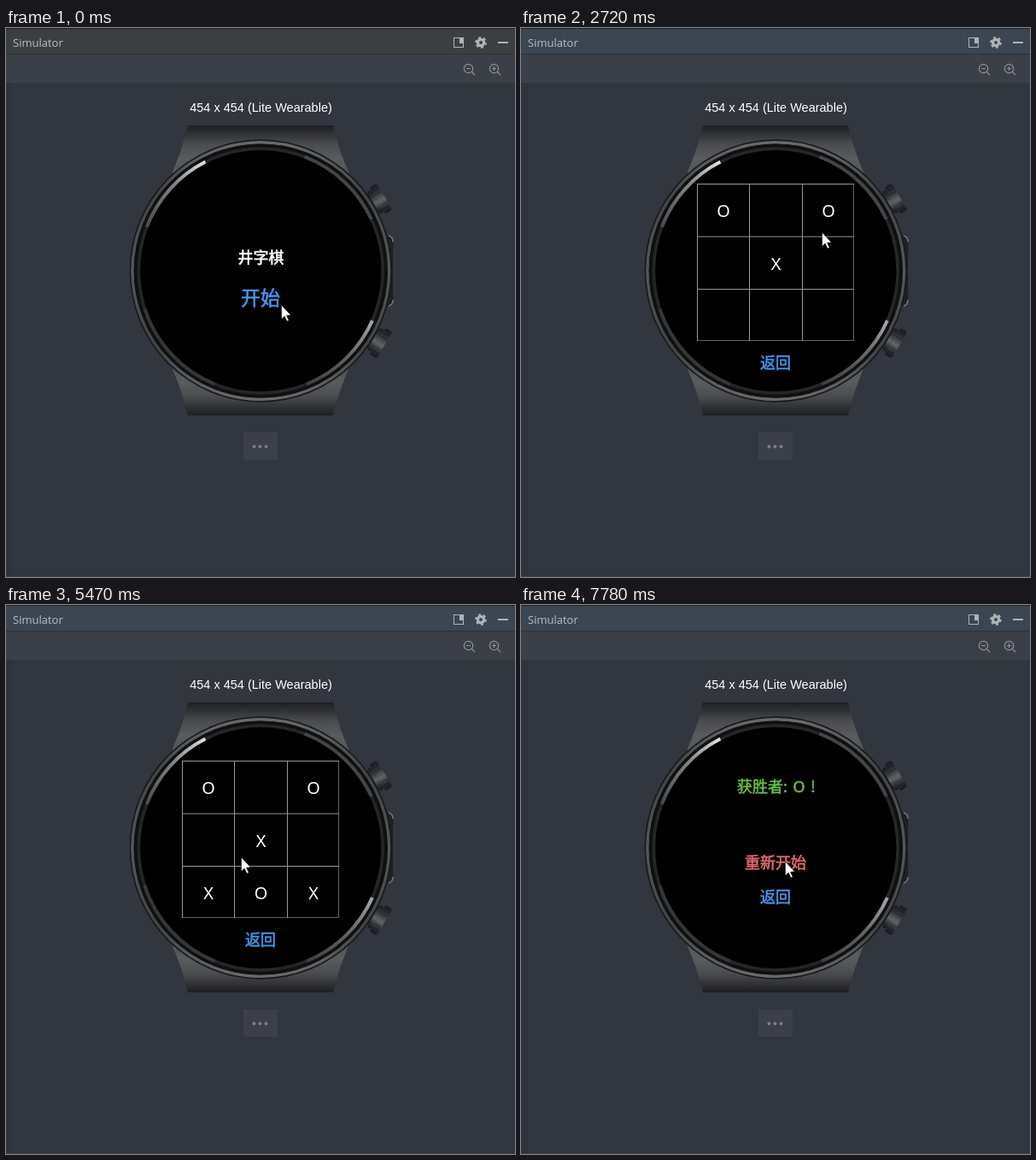
An HTML page for the animation above (8 s loop, 596x642 px).

```html
<!DOCTYPE html>
<html lang="zh">
<head>
<meta charset="utf-8">
<title>Simulator</title>
<style>
html, body { margin: 0; width: 100%; height: 100%; overflow: hidden; background: #31363f; }
svg { display: block; width: 596px; height: 642px; }
.zh { font: 500 18px "Noto Sans CJK SC", "Noto Sans CJK", sans-serif; text-anchor: middle; stroke-width: .6; }
.big { font-size: 23px; }
.mark { font: 20px "Noto Sans", sans-serif; text-anchor: middle; fill: #fff; }
.white { fill: #fff; stroke: #fff; }
.blue { fill: #4895ec; stroke: #4895ec; }
.green { fill: #6abb42; stroke: #6abb42; }
.red { fill: #e16a6d; stroke: #e16a6d; }
</style>
</head>
<body>
<svg viewBox="0 0 596 642">
  <defs>
    <linearGradient id="strap" x2="0" y2="1">
      <stop stop-color="#1f2022"/><stop offset=".1" stop-color="#2e2f31"/>
      <stop offset=".25" stop-color="#494b4e"/><stop offset=".45" stop-color="#595b5e"/>
      <stop offset="1" stop-color="#4a4c4f"/>
    </linearGradient>
    <linearGradient id="rim" x2="0" y2="1">
      <stop stop-color="#68696b"/><stop offset=".2" stop-color="#414345"/>
      <stop offset=".5" stop-color="#55575a"/><stop offset=".8" stop-color="#414345"/>
      <stop offset="1" stop-color="#68696b"/>
    </linearGradient>
    <linearGradient id="shine" gradientUnits="userSpaceOnUse" x1="144" y1="0" x2="107" y2="96">
      <stop stop-color="#47494b"/><stop offset=".6" stop-color="#85878a"/><stop offset="1" stop-color="#e2e3e4"/>
    </linearGradient>
    <linearGradient id="knob" x2="0" y2="1">
      <stop stop-color="#1a1b1d"/><stop offset=".3" stop-color="#343538"/>
      <stop offset=".55" stop-color="#626467"/><stop offset=".8" stop-color="#2c2d30"/>
      <stop offset="1" stop-color="#18191b"/>
    </linearGradient>
    <path id="band" fill="url(#strap)" d="M213 114H383C387 130 392 148 401 168V200H195V168C204 148 209 130 213 114Z"/>
    <g id="crown">
      <rect x="150" y="-13" width="12" height="26" fill="#202124"/>
      <rect x="154" y="-15" width="5" height="30" rx="2" fill="url(#knob)"/>
      <rect x="159" y="-18" width="10" height="36" rx="3" fill="url(#knob)"/>
      <path d="M160-12h8M160-7h8M160 7h8M160 12h8" stroke="#1c1d1f" opacity=".6"/>
    </g>
    <g id="lens" fill="none" stroke="#8c9097" stroke-width="1.2">
      <circle r="5.2"/><path d="M4 4L7.5 7.5M-2.5 0h5"/>
    </g>
  </defs>

  <rect width="596" height="642" fill="#31363f"/>
  <rect y="64" width="8" height="578" fill="#2f343a"/>
  <rect id="bar" width="596" height="31"/>
  <path d="M0 .5H596" stroke="#1f2123"/>
  <rect y="31" width="596" height="33" fill="#3b3f47"/>
  <path d="M0 30.5H596" stroke="#2d3035"/>
  <path d="M0 641.5H596" stroke="#3d4146"/>
  <text x="8" y="22" font-family="Open Sans, Noto Sans, sans-serif" font-size="13" fill="#bcbec1">Simulator</text>

  <g stroke="#b0b3b7" fill="none">
    <rect x="524.5" y="11.5" width="11" height="11"/>
    <path d="M531 15H536" stroke-width="6"/>
    <path d="M576 17H588" stroke-width="2"/>
    <g transform="translate(556 17)">
      <circle r="3.6" stroke-width="3.2"/>
      <circle r="5.8" stroke-width="2" pathLength="12" stroke-dasharray="1"/>
    </g>
  </g>
  <use href="#lens" x="541.5" y="47.5"/>
  <use href="#lens" x="571.5" y="47.5"/>
  <path d="M571.5 45v5" stroke="#8c9097" stroke-width="1.2"/>

  <text x="298.5" y="98" font-family="Liberation Sans, Arial, sans-serif" font-size="14.5" text-anchor="middle" fill="#fff">454 x 454 (Lite Wearable)</text>

  <use href="#band"/>
  <use href="#band" transform="matrix(1 0 0 -1 0 567)"/>
  <path d="M443 242H449Q454 243 454 249V319Q454 325 449 326H443Z" fill="#1f2023" stroke="#3a3c3f"/>
  <path d="M448 243Q453 244 453 250M453 318Q453 324 448 325" fill="none" stroke="#77797c" stroke-width="1.5"/>
  <g transform="translate(298.3 284)" fill="none">
    <use href="#crown" transform="rotate(-31)"/>
    <use href="#crown" transform="rotate(31)"/>
    <circle r="153.7" fill="#18191b"/>
    <circle r="150.3" stroke="url(#rim)" stroke-width="3.4"/>
    <circle r="146.5" stroke="#0f1011" stroke-width="4"/>
    <circle r="143" stroke="#252628" stroke-width="3.5"/>
    <circle r="141" fill="#000"/>
    <g stroke-width="4">
      <circle r="143" pathLength="360" stroke="#434547" stroke-dasharray="44 316" transform="rotate(-69)"/>
      <circle r="143" pathLength="360" stroke="#343638" stroke-dasharray="50 310" transform="rotate(112)"/>
      <circle r="143" pathLength="360" stroke="url(#shine)" stroke-dasharray="42 318" transform="rotate(201)"/>
      <circle r="143" pathLength="360" stroke="url(#shine)" stroke-dasharray="44 316" transform="rotate(68) scale(1 -1)" opacity=".65"/>
    </g>
  </g>

  <rect x="278" y="473" width="40" height="32" rx="1" fill="#3b3f48"/>
  <path d="M290.5 489.5h0m7 0h0m7 0h0" stroke="#7d8087" stroke-width="4" stroke-linecap="round"/>

  <g id="home" class="zh">
    <text x="298.5" y="275" class="white">井字棋</text>
    <text x="298" y="323.5" class="blue big">开始</text>
  </g>
  <g id="board">
    <path d="M389.5 182V366M206 365.5H390" stroke="#626262"/>
    <path d="M206.5 182V366M206 182.5H390M267.5 182V366M329.5 182V366M206 244H390M206 305.5H390" stroke="#969696"/>
    <g id="marks" class="mark"></g>
    <text x="298" y="398" class="zh blue">返回</text>
  </g>
  <g id="result" class="zh">
    <g class="green">
      <text x="253" y="219" style="text-anchor: start">获胜者:</text>
      <text x="325.5" y="219" font-family="Noto Sans, sans-serif" style="font-family: Noto Sans, sans-serif">O</text>
      <text x="342" y="219">!</text>
    </g>
    <text x="298" y="308" class="red">重新开始</text>
    <text x="298" y="348" class="blue">返回</text>
  </g>
  <path id="cursor" d="M.5 0V16.5L4.2 13 7 19 9.3 18 6.6 12.2 11.5 11.8Z" fill="#fff" stroke="#000" stroke-width=".6"/>
</svg>
<script>
const LOOP = 8000, FOCUS = 40, START = 120, WIN = 6660;

// start time, end time, destination
const moves = [
  [40, 530, 306, 305], [850, 1300, 236, 213], [1460, 1780, 313, 272],
  [2110, 2160, 318, 284], [2160, 2310, 352, 218], [2590, 3000, 353, 307],
  [3280, 3360, 353, 325], [3570, 3610, 352, 337], [3610, 3930, 299, 348],
  [4300, 4700, 247, 333], [4990, 5180, 253, 361], [5180, 5760, 297, 228],
  [5760, 5800, 296, 227], [6160, 6280, 296, 262], [6280, 6770, 312, 332],
  [7300, 7620, 309, 300]
];

// time, column, row; players alternate, O first
const turns = [
  [1460, 0, 0], [2110, 1, 1], [2590, 2, 0], [3610, 2, 2],
  [4300, 1, 2], [4990, 0, 2], [6160, 1, 0]
];

const $ = id => document.getElementById(id);
const show = (node, on) => node.setAttribute("visibility", on ? "inherit" : "hidden");

const marks = turns.map(([time, col, row], i) => {
  const node = document.createElementNS("http://www.w3.org/2000/svg", "text");
  node.setAttribute("x", 237 + col * 61.5);
  node.setAttribute("y", 221 + row * 61.5);
  node.textContent = "OX"[i % 2];
  $("marks").append(node);
  return { time, node };
});

function cursorAt(t) {
  let x = 322, y = 324;
  for (const [from, to, toX, toY] of moves) {
    if (t < from) break;
    const p = Math.min(1, (t - from) / (to - from));
    const ease = p * p * (3 - 2 * p);
    x += (toX - x) * ease;
    y += (toY - y) * ease;
  }
  return [Math.round(x), Math.round(y)];
}

function draw(now) {
  const t = now % LOOP;
  $("bar").setAttribute("fill", t < FOCUS ? "#3c3f41" : "#3b4652");
  show($("home"), t < START);
  show($("board"), t >= START && t < WIN);
  show($("result"), t >= WIN);
  for (const { time, node } of marks) show(node, t >= time);
  $("cursor").setAttribute("transform", `translate(${cursorAt(t)})`);
}

let origin;
function tick(now) {
  origin ??= now;
  draw(now - origin);
  requestAnimationFrame(tick);
}
draw(0);
requestAnimationFrame(tick);
</script>
</body>
</html>
```
